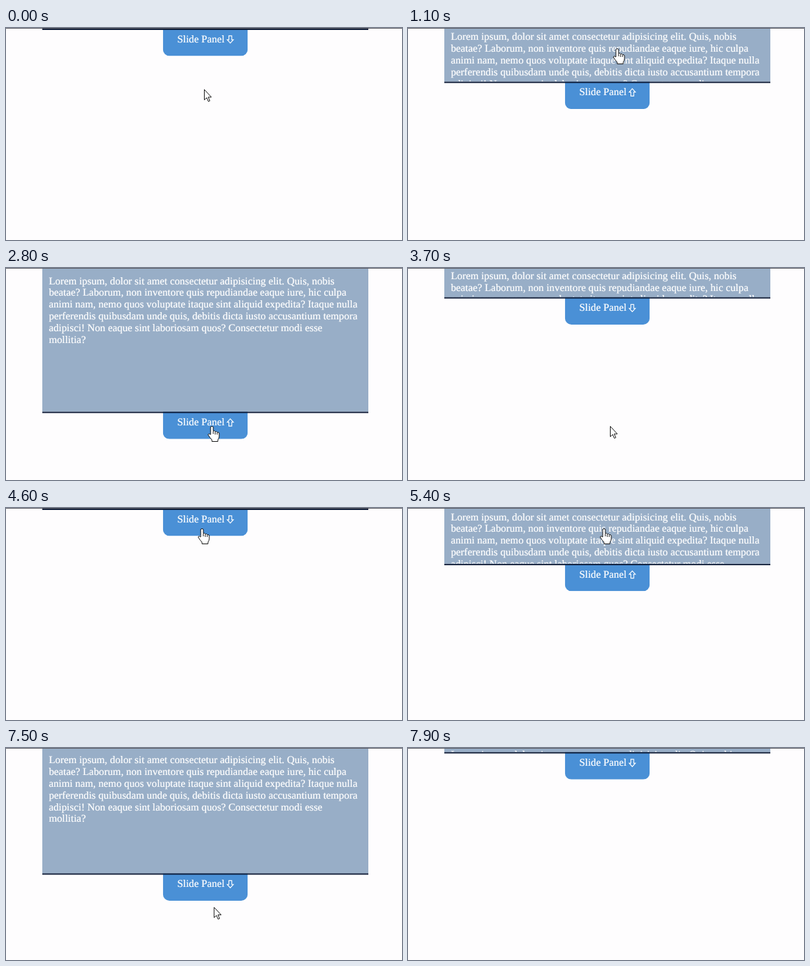
An HTML page that plays this animation: 600x322 px, repeating every 8 s.

```html
<!DOCTYPE html>
<html lang="en">
<head>
<meta charset="utf-8">
<title>Slide panel</title>
<style>
  html, body { margin: 0; width: 100%; height: 100%; overflow: hidden; background: #fefdfe; }
  svg { display: block; }
  text {
    font: 16px "Liberation Serif", "Times New Roman", serif;
    fill: #fff; stroke: #fff; stroke-width: .25; text-rendering: geometricPrecision;
  }
  .cursor { fill: #fff; stroke: #111; stroke-linejoin: round; }
</style>
</head>
<body>
<svg width="600" height="322" viewBox="0 0 600 322">
  <clipPath id="clip"><rect id="clipBox" width="500"/></clipPath>
  <g transform="translate(55 1) scale(.988)">
    <g clip-path="url(#clip)">
      <rect width="500" height="220" fill="#98aec7"/>
      <g id="copy"></g>
    </g>
    <g id="tab">
      <rect x="185" y="-10" width="130" height="52" rx="10" fill="#4a90d6" clip-path="inset(10px 0 0)"/>
      <rect width="500" height="2" fill="#0c1a36"/>
      <text x="207" y="21">Slide Panel</text>
      <path id="arrow" d="M-2.2 -5.5H2.2V.5H4.7L0 5.7L-4.7 .5H-2.2Z" fill="none" stroke="#fff" stroke-width="1.2"/>
    </g>
  </g>
  <rect width="600" height="1" fill="#5c5c64"/>
  <path id="pointer" class="cursor" d="M.5 .5V16.2L4.1 12.9L6.6 18.6L8.9 17.6L6.4 12H11.2Z"/>
  <path id="hand" class="cursor" d="M-2 13V2Q-2 .5 0 .5T2 2V7.5Q4 6.5 5 8.5Q7 7.5 8 9.5Q10.5 9 11 11V16Q11 18 9 21V23.5H0V21Q-3 18 -6 13Q-5 10.5 -2 13ZM2 8V12M5 9V13M8 10V13"/>
</svg>
<script>
const LOOP = 8000, STEP = 100, SLIDE = 600, HEIGHT = 220, SCALE = .988;
const CLICKS = [850, 3277, 5144, 7360]; // alternately open and close

const COPY = `Lorem ipsum, dolor sit amet consectetur adipisicing elit. Quis, nobis
beatae? Laborum, non inventore quis repudiandae eaque iure, hic culpa
animi nam, nemo quos voluptate itaque sint aliquid expedita? Itaque nulla
perferendis quibusdam unde quis, debitis dicta iusto accusantium tempora
adipisci! Non eaque sint laboriosam quos? Consectetur modi esse
mollitia?`;

const HOME = { x: 300, y: 93 };
const TRIPS = [
  { from: 0, to: 600, x: 317, y: 31 },
  { from: 1200, to: 1500, x: 318, y: 102 },
  { from: 1500, to: 2600, x: 312, y: 240 },
  { from: 3300, to: 3600, x: 306, y: 240 },
  { from: 3700, to: 4600, x: 297, y: 31 },
  { from: 5800, to: 6700, x: 314, y: 231 },
  { from: 7400, to: 7900, x: 322, y: 340 }
];

const $ = id => document.getElementById(id);
const place = (id, x, y, extra = "") => $(id).setAttribute("transform", `translate(${x} ${y})${extra}`);
const swing = k => .5 - Math.cos(Math.PI * Math.min(1, k)) / 2;

$("copy").innerHTML = COPY.split("\n")
  .map((line, i) => `<text x="10" y="${14 + 18 * i}">${line}</text>`).join("");

function panelState(t) {
  const last = CLICKS.filter(click => click <= t).length - 1;
  if (last < 0) return { opening: false, open: 0 };
  const opening = last % 2 === 0, k = swing((t - CLICKS[last]) / SLIDE);
  return { opening, open: opening ? k : 1 - k };
}

function cursorState(t) {
  const i = TRIPS.findLastIndex(trip => trip.from <= t);
  const start = TRIPS[i - 1] || HOME, trip = TRIPS[i];
  const k = swing((t - trip.from) / (trip.to - trip.from));
  const x = start.x + (trip.x - start.x) * k, y = start.y + (trip.y - start.y) * k;

  // The shape is only updated while the mouse moves.
  const overTab = y / SCALE - HEIGHT * panelState(Math.min(t, trip.to)).open;
  return { x, y, shape: overTab > 0 && overTab < 43 ? "hand" : "pointer" };
}

function draw(now) {
  const t = Math.floor(now % LOOP / STEP) * STEP;
  const { opening, open } = panelState(t);
  $("clipBox").setAttribute("height", HEIGHT * open);
  place("copy", 0, 10 * open);
  place("tab", 0, HEIGHT * open);
  place("arrow", 288.3, 16.5, opening ? " scale(1 -1)" : "");

  const { x, y, shape } = cursorState(t);
  for (const id of ["pointer", "hand"]) {
    place(id, x, y);
    $(id).style.display = id === shape ? "" : "none";
  }
}

const start = performance.now();
function tick() {
  draw(performance.now() - start);
  requestAnimationFrame(tick);
}
tick();
</script>
</body>
</html>
```
